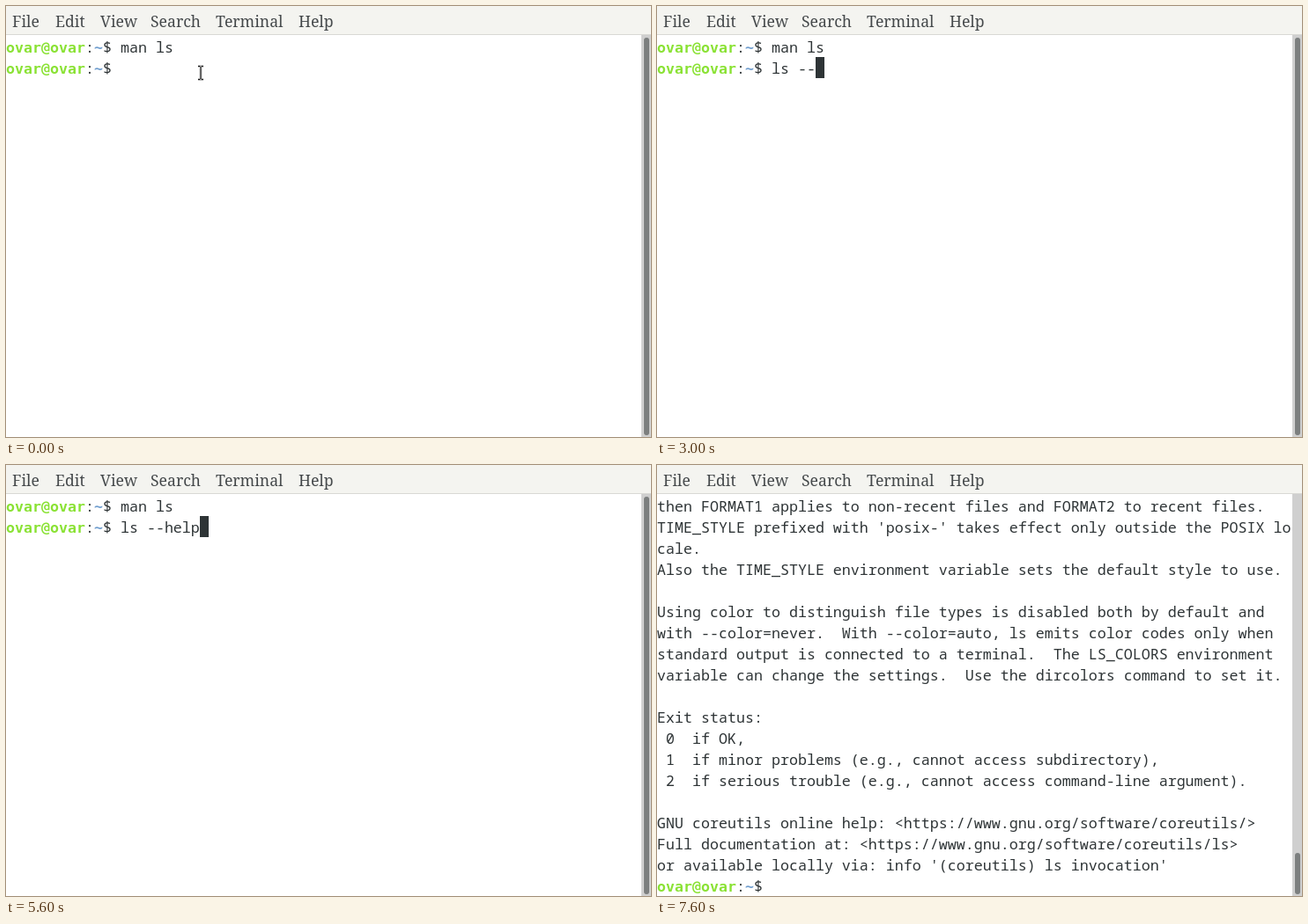
These frames come from a looping animation (732 by 490 pixels, 8 s). An HTML page:

```html
<!DOCTYPE html>
<html lang="en">
<head>
<meta charset="utf-8">
<title>Terminal</title>
<style>
html, body { margin: 0; width: 100%; height: 100%; overflow: hidden; background: #fff; }
#stage { position: relative; width: 732px; height: 490px; overflow: hidden; color: #2e3436; }
#stage > *, #menu span { position: absolute; }
#menu { left: 0; top: 0; width: 732px; height: 32px; background: #f4f4f0; border-bottom: 1px solid #d8d8d5;
  font: 17.6px/34px "Noto Serif", serif; color: #45494b; }
#screen { left: 0; top: 35px; margin: 0; font: 16.667px/24px "Noto Sans Mono", monospace; }
#screen div { height: 24px; white-space: pre; }
#screen b { font: bold 16.6px/0 "DejaVu Sans Mono", monospace; }
.user { color: #8ae234; }
.path { color: #729fcf; }
#cursor { width: 10px; height: 24px; background: #2e3436; }
#track { left: 721px; top: 33px; width: 11px; height: 457px; background: #cfcfcf; }
#thumb { left: 724px; width: 6px; border-radius: 3px; background: #7c7f7f; }
#pointer { left: 216px; top: 67px; }
</style>
</head>
<body>
<div id="stage">
  <div id="menu">
    <span style="left:7px">File</span><span style="left:56px">Edit</span>
    <span style="left:107px">View</span><span style="left:164px">Search</span>
    <span style="left:238px">Terminal</span><span style="left:332px">Help</span>
  </div>
  <div id="screen"></div>
  <div id="cursor"></div>
  <div id="track"></div>
  <div id="thumb"></div>
  <svg id="pointer" width="10" height="18" fill="none">
    <path id="beam" d="M2 1.5h2l1 1 1-1h2M5 2.5v13M2 16.5h2l1-1 1 1h2" stroke="#bbb" stroke-width="2.5"/>
    <use href="#beam"/>
    <path d="M2 1.5h2l1 1 1-1h2M5 2.5v13M2 16.5h2l1-1 1 1h2" stroke="#111"/>
  </svg>
</div>
<script>
const LOOP = 8000, OUTPUT_AT = 5800, POINTER_HIDES = 600;
const COMMAND = "ls --help";
const KEY_TIMES = [600, 800, 1600, 2500, 3000, 3500, 3800, 4100, 4400];
// The cursor starts hidden and toggles at each of these times.
const BLINKS = [400, 1400, 1600, 2100, 2400, 3300, 3400, 5500, 5600, 6400, 7500, 7600];
const HELP = `then FORMAT1 applies to non-recent files and FORMAT2 to recent files.
TIME_STYLE prefixed with 'posix-' takes effect only outside the POSIX lo
cale.
Also the TIME_STYLE environment variable sets the default style to use.

Using color to distinguish file types is disabled both by default and
with --color=never.  With --color=auto, ls emits color codes only when
standard output is connected to a terminal.  The LS_COLORS environment
variable can change the settings.  Use the dircolors command to set it.

Exit status:
 0  if OK,
 1  if minor problems (e.g., cannot access subdirectory),
 2  if serious trouble (e.g., cannot access command-line argument).

GNU coreutils online help: <https://www.gnu.org/software/coreutils/>
Full documentation at: <https://www.gnu.org/software/coreutils/ls>
or available locally via: info '(coreutils) ls invocation'`;

const PROMPT = '<b class="user">ovar@ovar</b>:<b class="path">~</b>$ ';
const find = id => document.getElementById(id);
const [screenBox, cursor, thumb, pointer] = ["screen", "cursor", "thumb", "pointer"].map(find);
const passed = (times, t) => times.filter(time => time <= t).length;
const escapeText = text => text.replace(/</g, "&lt;").replace(/>/g, "&gt;");
const helpRows = escapeText(HELP).split("\n");
let shown = "";

function draw(t) {
  const finished = t >= OUTPUT_AT;
  const typed = finished ? "" : COMMAND.slice(0, passed(KEY_TIMES, t));
  const rows = [...(finished ? helpRows : [PROMPT + "man ls"]), PROMPT + typed];
  const html = rows.map(row => `<div>${row}</div>`).join("");
  if (html !== shown) screenBox.innerHTML = shown = html;

  cursor.style.left = 130 + typed.length * 10 + "px";
  cursor.style.top = 34 + (rows.length - 1) * 24 + "px";
  cursor.style.visibility = passed(BLINKS, t) % 2 ? "visible" : "hidden";
  pointer.style.visibility = t < POINTER_HIDES ? "visible" : "hidden";
  const top = finished ? 441 : 36;
  thumb.style.top = top + "px";
  thumb.style.height = 488 - top + "px";
}

const start = performance.now();
function tick() {
  draw((performance.now() - start) % LOOP);
  requestAnimationFrame(tick);
}
tick();
</script>
</body>
</html>
```
